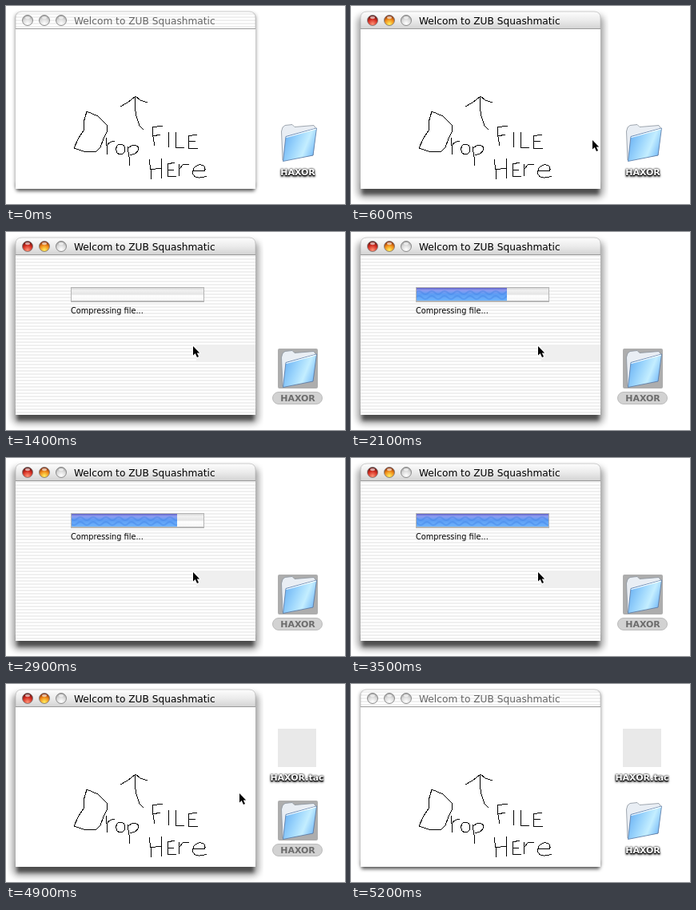
Animation, 424 px wide and 248 px high, one loop 5700 ms. Source, as an HTML page:

```html
<!DOCTYPE html>
<html lang="en">
<head>
<meta charset="utf-8">
<title>Drop to compress</title>
<style>
html, body { margin: 0; width: 100%; height: 100%; overflow: hidden; background: #fff; }
svg { display: block; width: 100vw; height: 100vh; }
text { font-family: "DejaVu Sans", "Noto Sans", sans-serif; }
.title { font-size: 12.2px; }
.note { font-size: 9.75px; }
.label { font-size: 11px; font-weight: 700; text-anchor: middle; }
.lit { fill: #fff; filter: drop-shadow(0 1px 0.6px #000) drop-shadow(0 0.5px 0.8px #000) drop-shadow(0 1px 1px #0008); }
.ink { fill: none; stroke: #000; stroke-width: 1; shape-rendering: crispEdges; }
.near { filter: blur(2px); }
.far { filter: blur(4.5px); }
</style>
</head>
<body>
<svg viewBox="0 0 424 248" preserveAspectRatio="none">
  <defs>
    <linearGradient id="barOn" x2="0" y2="1">
      <stop stop-color="#fdfdfd"/><stop offset=".5" stop-color="#ebebeb"/><stop offset="1" stop-color="#d2d2d2"/>
    </linearGradient>
    <linearGradient id="face" x1="0" y1=".2" x2="1" y2=".6">
      <stop stop-color="#66aef2"/><stop offset=".4" stop-color="#9ad4fc"/>
      <stop offset=".7" stop-color="#c4eeff"/><stop offset="1" stop-color="#78bcf8"/>
    </linearGradient>
    <linearGradient id="fluid" x2="0" y2="1">
      <stop stop-color="#5f5fc4"/><stop offset=".18" stop-color="#8f9cf0"/>
      <stop offset=".5" stop-color="#5b9cf4"/><stop offset="1" stop-color="#6fb4fc"/>
    </linearGradient>
    <linearGradient id="trough" x2="0" y2="1">
      <stop stop-color="#cfcfcf"/><stop offset=".2" stop-color="#f2f2f2"/>
      <stop offset=".5" stop-color="#e4e4e4"/><stop offset=".6" stop-color="#fff"/><stop offset="1" stop-color="#f4f4f4"/>
    </linearGradient>
    <radialGradient id="red" cy=".85" r=".85"><stop stop-color="#ff9478"/><stop offset=".55" stop-color="#d42c20"/><stop offset="1" stop-color="#4a0c0a"/></radialGradient>
    <radialGradient id="amber" cy=".85" r=".85"><stop stop-color="#fff060"/><stop offset=".55" stop-color="#f08a18"/><stop offset="1" stop-color="#7a1c08"/></radialGradient>
    <radialGradient id="dull" cy=".8" r=".8"><stop stop-color="#fff"/><stop offset=".6" stop-color="#d8d8d8"/><stop offset="1" stop-color="#999"/></radialGradient>
    <pattern id="pin" width="4" height="4" patternUnits="userSpaceOnUse">
      <rect width="4" height="4" fill="#fff"/><rect y="1" width="4" height="2" fill="#f0f0f0"/>
    </pattern>
    <clipPath id="fillClip"><rect id="fill" x="82" y="70" height="16"/></clipPath>
    <clipPath id="shadowClip"><path d="M2 4H322V247H2Z"/></clipPath>
    <g id="folder">
      <path d="M344.500 157L346 152L349 149.500L358 148.500L361 151.500L385 149.500L387.500 153L384 187L346 193Z" fill="#e9eef4" stroke="#8a929c" stroke-width=".8"/>
      <path d="M350 163.500L388.500 153L384 187L346.500 194.500Z" fill="url(#face)" stroke="#5878a4" stroke-width=".8"/>
      <path d="M350.500 164.500L388 154" stroke="#fff" stroke-width="1.200"/>
    </g>
  </defs>
  <rect width="424" height="248" fill="#fff"/>

  <g id="shadowOff" class="near">
    <rect x="11" y="9" width="302" height="222" rx="6" opacity=".35"/>
    <rect x="13" y="222" width="298" height="10" opacity=".5"/>
  </g>
  <g id="shadowOn" clip-path="url(#shadowClip)">
    <rect class="far" x="8" y="12" width="308" height="228" rx="8" opacity=".38"/>
    <rect class="near" x="14" y="222" width="296" height="14" opacity=".5"/>
  </g>
  <path id="bar" d="M12 29V15Q12 7 20 7H304Q312 7 312 15V29Z" stroke="#b0b0b0" stroke-width=".6"/>
  <path d="M12 28.500H312" stroke="#9a9a9a"/>
  <g id="buttons" stroke="#777" stroke-width=".8"></g>
  <text id="title" class="title" x="85" y="23">Welcom to ZUB Squashmatic</text>
  <rect x="12" y="29" width="300" height="200" fill="#fff"/>

  <g id="dropPane">
    <path id="scrawl" class="ink"/>
    <rect id="ring" x="14.500" y="31.500" width="295" height="195" fill="none" stroke="#878787" stroke-width="5"/>
  </g>
  <g id="workPane">
    <rect x="12" y="29" width="300" height="200" fill="url(#pin)"/>
    <rect x="238" y="141" width="74" height="22" fill="#efefef"/>
    <rect x="81" y="86" width="167" height="2" fill="#bbb"/>
    <rect x="81.500" y="69.500" width="166" height="17" fill="url(#trough)" stroke="#b4b4b4"/>
    <g clip-path="url(#fillClip)">
      <rect x="82" y="70" width="166" height="16" fill="url(#fluid)"/>
      <path id="waves" fill="none" stroke="#3f80e4" stroke-width="2" opacity=".4"/>
    </g>
    <text class="note" x="81" y="102">Compressing file...</text>
  </g>

  <g id="archive">
    <rect x="340" y="56" width="48" height="48" fill="#e9e9e9"/>
    <text class="label lit" x="364" y="121">HAXOR.tac</text>
  </g>
  <g id="picked">
    <rect x="340" y="146" width="50" height="50" rx="2" fill="#adadad"/>
    <rect x="333.500" y="200.500" width="62" height="15" rx="7.500" fill="#d2d2d2" stroke="#bcbcbc"/>
    <text class="label" x="365" y="212" fill="#6c6c6c">HAXOR</text>
  </g>
  <use href="#folder"/>
  <text id="plainLabel" class="label lit" x="365" y="212">HAXOR</text>

  <g id="ghost">
    <g opacity=".45">
      <rect x="340" y="147" width="50" height="50" fill="#b4b4b4"/>
      <use href="#folder"/>
    </g>
    <rect x="333" y="200" width="63" height="17" rx="8" fill="#7c7cf4" opacity=".45"/>
    <text class="label" x="365" y="212.500" fill="#fff">HAXOR</text>
  </g>
  <path id="cursor" d="M0 0V11.500L2.700 9L5 14L7 13L4.800 8.500H8.200Z" stroke="#fff" stroke-width="1.600" paint-order="stroke"/>
</svg>
<script>
const LOOP = 5700, TICK = 100;
const el = id => document.getElementById(id);
const show = (id, on) => { el(id).style.display = on ? "" : "none"; };
const within = (t, a, b) => t >= a && t < b;

// Hand-drawn arrow and the words below it
el("scrawl").setAttribute("d", [
  "M143 126L152 121L162 113L168 118L177 121M162 113L161 125L163 138L167 150L172 155",
  "M101 132L97 146L97 156L91 165L85 178L97 182L112 183L118 177L122 166L126 158L126 149L115 138Z",
  "M125 165L126 175L127 186M126 175Q130 169 136 169",
  "M143 173C136 174 136 185 143 186C151 185 151 173 143 173",
  "M152 176L154 189L154 200M153 178Q160 171 166 177Q166 185 155 187",
  "M183 152L184 164L186 175M183 152L196 150M184 163L193 161",
  "M203 158L204 177",
  "M212 158L213 178L223 177",
  "M228 162L229 179L240 178M228 163L239 161M228 170L237 169",
  "M179 192L181 205L182 217M194 191L194 204L195 216M181 205L194 203",
  "M202 198L203 214L213 213M202 198L211 196M202 206L210 205",
  "M216 198L217 213M217 204L221 199L229 198",
  "M234 207L249 206Q250 198 241 199Q232 202 234 211Q238 218 251 213"
].join(""));

// Cursor tip: [time, x, y]; null hides it
const moves = [
  [0, null], [300, 391, 152], [400, 345, 160], [500, 302, 168], [700, 334, 171], [800, 364, 174],
  [900, 329, 166], [1000, 277, 154], [1100, 234, 143],
  [4900, 292, 137], [5000, 358, 132], [5100, 409, 129], [5200, null]
];

function paintButtons(active) {
  const tints = active ? ["red", "amber", "dull"] : ["dull", "dull", "dull"];
  el("buttons").innerHTML = tints.map((c, i) =>
    `<circle cx="${27 + 21 * i}" cy="18" r="6.500" fill="url(#${c})"/>` +
    `<ellipse cx="${27 + 21 * i}" cy="14.500" rx="3" ry="1.700" fill="#fff" stroke="none" opacity=".6"/>`).join("");
}

function wavePath(shift) {
  let d = "";
  for (const y of [76, 82]) {
    for (let x = 66 + shift; x < 250; x += 16) d += `M${x} ${y}q4 -4 8 0t8 0`;
  }
  return d;
}

function draw(t) {
  const active = within(t, 500, 5100);
  const picked = within(t, 800, 5100);
  const working = within(t, 1400, 3600);

  show("shadowOn", active);
  show("shadowOff", !active);
  el("bar").setAttribute("fill", active ? "url(#barOn)" : "url(#pin)");
  el("title").setAttribute("fill", active ? "#000" : "#666");
  paintButtons(active);

  show("dropPane", !working);
  show("workPane", working);
  show("ring", within(t, 1000, 1300));
  show("picked", picked);
  show("plainLabel", !picked);
  show("archive", t >= 3900);

  // Fills steadily, stalls at 80 percent, then finishes
  const stalled = Math.min(132, Math.max(0, 113 + 0.195 * (t - 2100)));
  el("fill").setAttribute("width", t < 3300 ? stalled : t < 3400 ? 150 : 165);
  el("waves").setAttribute("d", wavePath((t / TICK * 3) % 16));

  const [, x, y] = moves.filter(m => m[0] <= t).pop();
  show("cursor", x !== null);
  show("ghost", within(t, 900, 1200));
  if (x !== null) {
    el("cursor").setAttribute("transform", `translate(${x} ${y})`);
    el("ghost").setAttribute("transform", `translate(${x - 364} ${y - 174})`);
  }
}

let last = -1;
const start = performance.now();
function loop() {
  const t = Math.floor(((performance.now() - start) % LOOP) / TICK) * TICK;
  if (t !== last) draw(last = t);
  requestAnimationFrame(loop);
}
loop();
</script>
</body>
</html>
```
